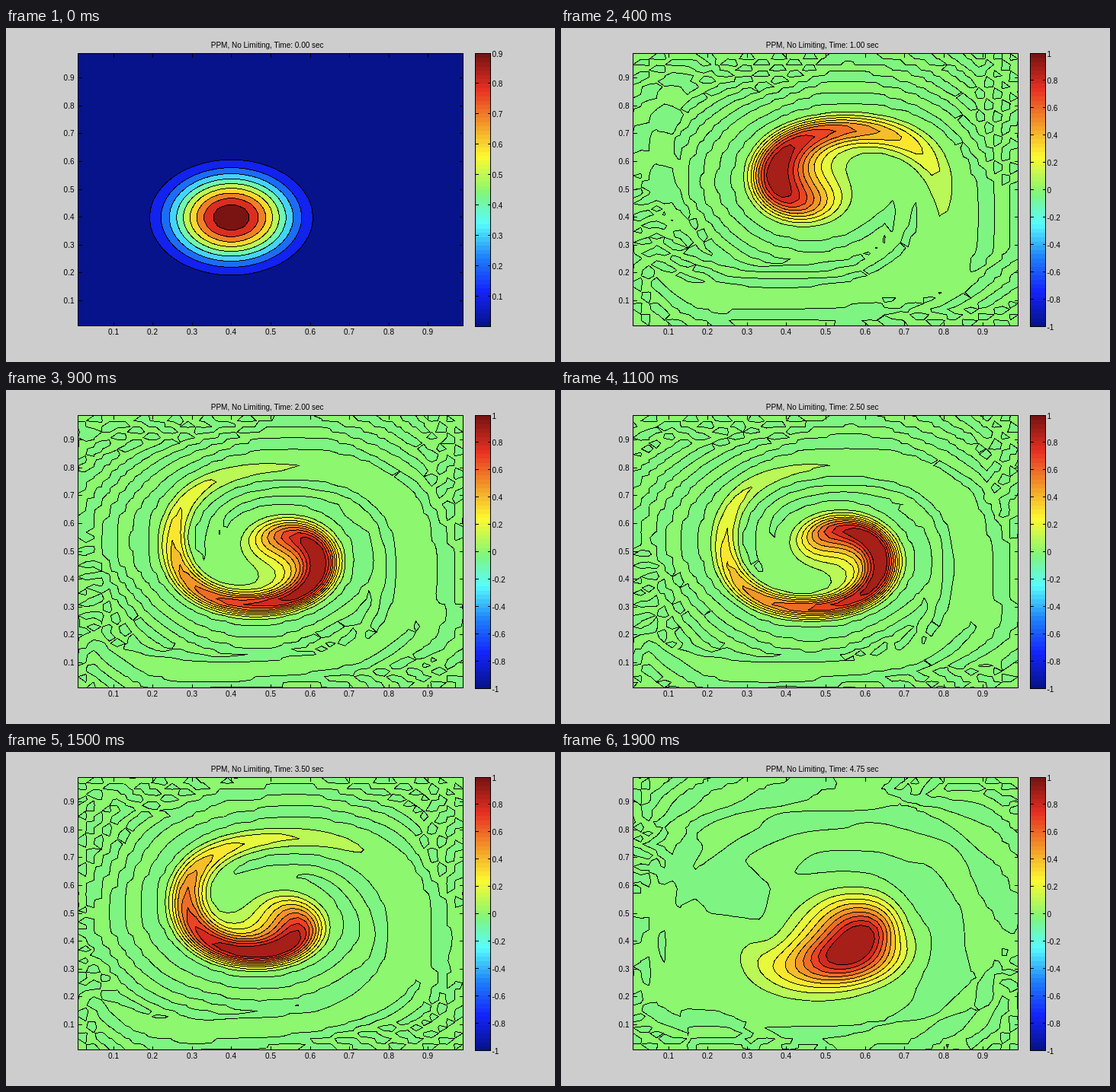
Recreate the animation shown at these times as an HTML page. Size 720 px wide and 439 px high, loop 2.1 s.

```html
<!DOCTYPE html>
<html lang="en">
<head>
<meta charset="utf-8">
<title>Swirling flow</title>
<style>
  html, body { margin: 0; width: 100%; height: 100%; overflow: hidden; background: #cdcdcd; }
  svg { display: block; width: 100vw; height: 100vh; }
  text { font: 10px "Liberation Sans", Arial, sans-serif; fill: #000; }
</style>
</head>
<body>
<svg id="stage" viewBox="0 0 720 439"></svg>
<script>
const N = 50, DX = 1 / N, PERIOD = 5, DT = 0.0125, OUT = 0.25;
const BOX = { x: 94.5, y: 33.5, w: 505, h: 358 };
const BAR = { x: 615.5, y: 33.5, w: 20, h: 359 };
const LOOP = 2100;

// [start in ms, simulated seconds]
const SHOTS = [
  [0, 0], [200, 0.5], [300, 0.75], [400, 1], [500, 1.25],
  [700, 1.5], [800, 1.75], [900, 2], [1000, 2.25], [1100, 2.5],
  [1300, 3], [1400, 3.25], [1500, 3.5], [1600, 3.75], [1700, 4], [1900, 4.75]
];

const PALETTE = [
  [0, 6, 19, 139], [0.125, 20, 36, 252], [0.25, 30, 128, 250],
  [0.375, 87, 253, 254], [0.485, 126, 245, 130], [0.5, 140, 247, 111],
  [0.625, 253, 250, 48], [0.875, 231, 48, 34], [1, 122, 20, 18]
];

function color(f) {
  f = Math.min(1, Math.max(0, f));
  let i = 1;
  while (i < PALETTE.length - 1 && PALETTE[i][0] < f) i++;
  const a = PALETTE[i - 1], b = PALETTE[i], k = (f - a[0]) / (b[0] - a[0]);
  return `rgb(${[1, 2, 3].map(c => Math.round(a[c] + (b[c] - a[c]) * k))})`;
}

// --- advection: unlimited PPM, x sweep then y sweep ---

const psi = (i, j) => (Math.sin(Math.PI * i * DX) * Math.sin(Math.PI * j * DX)) ** 2 / Math.PI;
const faceSpeed = [];
for (let f = 0; f <= N; f++) {
  faceSpeed.push(Array.from({ length: N }, (_, l) => (psi(f, l + 1) - psi(f, l)) / DX));
}

function sweep(q, step, across, scale) {
  const at = (l, i) => q[Math.min(N - 1, Math.max(0, i)) * step + l * across];
  const edge = new Float64Array(N + 1), flux = new Float64Array(N + 1);
  for (let l = 0; l < N; l++) {
    for (let f = 0; f <= N; f++) {
      edge[f] = (7 * (at(l, f - 1) + at(l, f)) - at(l, f - 2) - at(l, f + 1)) / 12;
    }
    for (let f = 1; f < N; f++) {
      const s = faceSpeed[f][l] * scale, c = Math.abs(s), i = s > 0 ? f - 1 : f;
      const left = edge[i], right = edge[i + 1], d = right - left;
      const bend = (1 - 2 * c / 3) * (6 * at(l, i) - 3 * (left + right));
      flux[f] = s * (s > 0 ? right - c / 2 * (d - bend) : left + c / 2 * (d + bend));
    }
    for (let i = 0; i < N; i++) q[i * step + l * across] -= flux[i + 1] - flux[i];
  }
}

function simulate() {
  const q = new Float64Array(N * N), fields = [];
  for (let j = 0; j < N; j++) for (let i = 0; i < N; i++) {
    const x = (i + 0.5) * DX - 0.4, y = (j + 0.5) * DX - 0.4;
    q[j * N + i] = 0.99 * Math.max(0, 1 - 8.58 * (x * x + y * y)) ** 5;
  }
  const perShot = Math.round(OUT / DT), total = 19 * perShot;
  for (let n = 0; n <= total; n++) {
    if (n % perShot === 0) fields.push(q.slice());
    const scale = Math.cos(Math.PI * n * DT / PERIOD) * DT / DX;
    sweep(q, 1, N, scale);
    sweep(q, N, 1, -scale);
  }
  return fields;
}

// --- contours ---

const px = i => BOX.x + BOX.w * i / (N - 1);
const py = j => BOX.y + BOX.h * (1 - j / (N - 1));
const pt = p => p[0].toFixed(2) + " " + p[1].toFixed(2);

function contour(q, level) {
  let area = "", line = "";
  for (let j = 0; j < N - 1; j++) for (let i = 0; i < N - 1; i++) {
    const cell = [[i, j], [i + 1, j], [i + 1, j + 1], [i, j + 1]]
      .map(([a, b]) => ({ v: q[b * N + a] - level, p: [px(a), py(b)] }));
    const shape = [], cross = [];
    cell.forEach((a, k) => {
      const b = cell[(k + 1) % 4];
      if (a.v >= 0) shape.push(a.p);
      if ((a.v >= 0) !== (b.v >= 0)) {
        const m = a.v / (a.v - b.v);
        const p = [a.p[0] + (b.p[0] - a.p[0]) * m, a.p[1] + (b.p[1] - a.p[1]) * m];
        shape.push(p);
        cross.push({ p, leaving: a.v >= 0 });
      }
    });
    if (shape.length) area += "M" + shape.map(pt).join("L") + "Z";
    cross.forEach((c, k) => {
      if (c.leaving) line += "M" + pt(c.p) + "L" + pt(cross[(k + 1) % cross.length].p);
    });
  }
  return { area, line };
}

function plot(q, first) {
  let fills = "", lines = "";
  for (let k = first ? 1 : 0; k <= 9; k++) {
    const { area, line } = contour(q, k / 10);
    const f = first ? k / 9 : 0.5 + k / 20;
    fills += `<path d="${area}" fill="${color(f)}"/>`;
    lines += line;
  }
  const base = color(first ? 0 : 0.485);
  return `<rect x="${BOX.x}" y="${BOX.y}" width="${BOX.w}" height="${BOX.h}" fill="${base}"/>` +
    fills + `<path d="${lines}" fill="none" stroke="#000" stroke-linecap="round"/>`;
}

// --- fixed parts ---

const text = (x, y, s, anchor = "start") =>
  `<text x="${x}" y="${y}" text-anchor="${anchor}">${s}</text>`;
const frame = b =>
  `<rect x="${b.x}" y="${b.y}" width="${b.w}" height="${b.h}" fill="none" stroke="#000"/>`;

function axes() {
  let ticks = "", labels = "";
  const right = BOX.x + BOX.w, bottom = BOX.y + BOX.h;
  for (let k = 1; k <= 9; k++) {
    const x = Math.round(px(k * 5 - 0.5)) + 0.5, y = Math.round(py(k * 5 - 0.5)) - 0.5;
    ticks += `M${x} ${bottom}v-5M${x} ${BOX.y}v5M${BOX.x} ${y}h5M${right} ${y}h-5`;
    labels += text(x - 0.5, 403, "0." + k, "middle") + text(89.5, y + 3.5, "0." + k, "end");
  }
  return `<path d="${ticks}" stroke="#000" shape-rendering="crispEdges"/>` +
    `<g shape-rendering="crispEdges">${frame(BOX)}</g>` + labels;
}

function colorBar() {
  let s = "";
  const h = BAR.h / 64;
  for (let k = 0; k < 64; k++) {
    s += `<rect x="${BAR.x}" y="${BAR.y + BAR.h - (k + 1) * h}" width="${BAR.w}" height="${h + 0.3}" fill="${color(k / 63)}"/>`;
  }
  return `<g shape-rendering="crispEdges">${s}${frame(BAR)}</g>`;
}

function scaleMarks(first) {
  let ticks = "", labels = "";
  const count = first ? 9 : 10;
  for (let k = first ? 1 : 0; k <= count; k++) {
    const y = Math.round(BAR.y + BAR.h * (1 - k / count)) - 0.5;
    const v = first ? k / 10 : (k - 5) / 5;
    ticks += `M${BAR.x} ${y}h4M${BAR.x + BAR.w} ${y}h-4`;
    labels += text(637.5, y + 4, v);
  }
  return `<path d="${ticks}" stroke="#000" shape-rendering="crispEdges"/>` + labels;
}

const stage = document.getElementById("stage");
stage.innerHTML = `<rect width="720" height="439" fill="#cdcdcd"/>
  <g id="field" shape-rendering="crispEdges"></g>${axes()}${colorBar()}
  <g id="marks"></g><text id="title" x="342.7" y="26" text-anchor="middle"></text>`;

const fields = simulate();
const views = SHOTS.map(([, t], n) => ({
  field: plot(fields[Math.round(t / OUT)], n === 0),
  marks: scaleMarks(n === 0),
  title: `PPM, No Limiting, Time: ${t.toFixed(2)} sec`
}));
const field = document.getElementById("field");
const marks = document.getElementById("marks");
const title = document.getElementById("title");
let shown = -1;

function render(ms) {
  let n = SHOTS.length - 1;
  while (SHOTS[n][0] > ms) n--;
  if (n === shown) return;
  shown = n;
  field.innerHTML = views[n].field;
  marks.innerHTML = views[n].marks;
  title.textContent = views[n].title;
}

let start = null;
function tick(now) {
  if (start === null) start = now;
  render((now - start) % LOOP);
  requestAnimationFrame(tick);
}
render(0);
requestAnimationFrame(tick);
</script>
</body>
</html>
```
